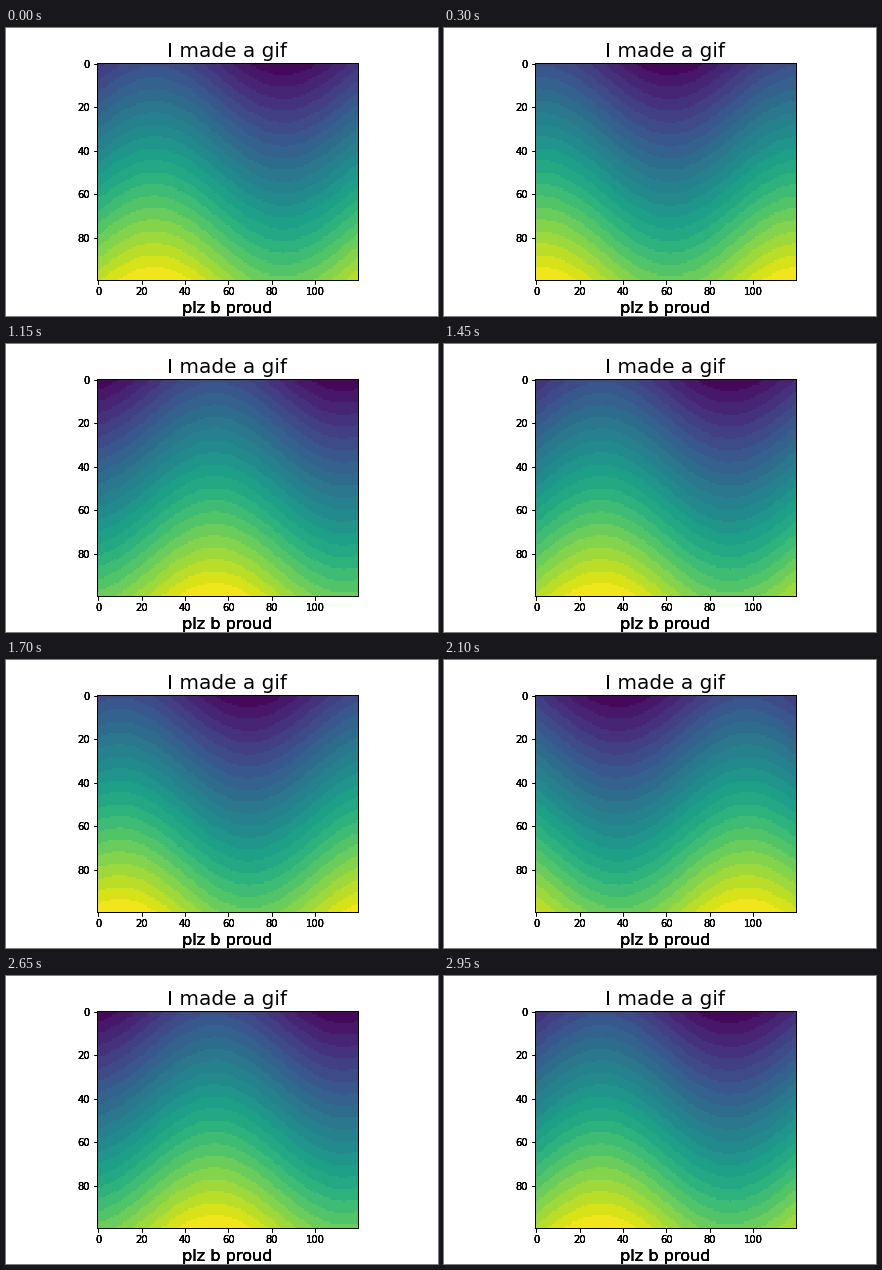
Animation, 432 px wide and 288 px high, one loop 3000 ms. Source, as a matplotlib script:

```python
import numpy as np
import matplotlib.pyplot as plt
from matplotlib.animation import FuncAnimation
from matplotlib.colors import ListedColormap

FRAMES = 60
INTERVAL = 50
BANDS = 24
LAYERS = 4  # the axis text is overprinted, which makes it look heavy

plt.rcParams.update({"font.family": "DejaVu Sans", "font.size": 10})

x = np.linspace(0, 2 * np.pi, 120)
y = np.linspace(0, 2 * np.pi, 100).reshape(-1, 1)
cmap = ListedColormap(plt.get_cmap("viridis")((np.arange(BANDS) + 0.5) / BANDS))


def wave(i):
    """Travelling sine on a vertical ramp, scaled to its own range."""
    z = np.sin(x + (i + 1) * np.pi / 15) + y
    return (z - z.min()) / (z.max() - z.min())


fig = plt.figure(figsize=(6, 4), dpi=72, facecolor="white")
fig.subplots_adjust(left=0.125, right=0.9, bottom=0.125, top=0.88)


def add_layer():
    ax = fig.add_subplot()
    ax.set(xlim=(-0.5, 119.5), ylim=(99.5, -0.5), aspect="equal",
           xticks=range(0, 101, 20), yticks=range(0, 81, 20))
    ax.set_xlabel("plz b proud", fontsize=16)
    ax.patch.set_visible(False)
    return ax


axes = [add_layer() for _ in range(LAYERS)]
axes[0].set_title("I made a gif", fontsize=20)
image = axes[0].imshow(wave(0), cmap=cmap, vmin=0, vmax=1, interpolation="nearest")


def update(i):
    image.set_data(wave(i))
    return [image]


anim = FuncAnimation(fig, update, frames=FRAMES, interval=INTERVAL,
                     repeat=True, repeat_delay=0, blit=False)
plt.show()
```
